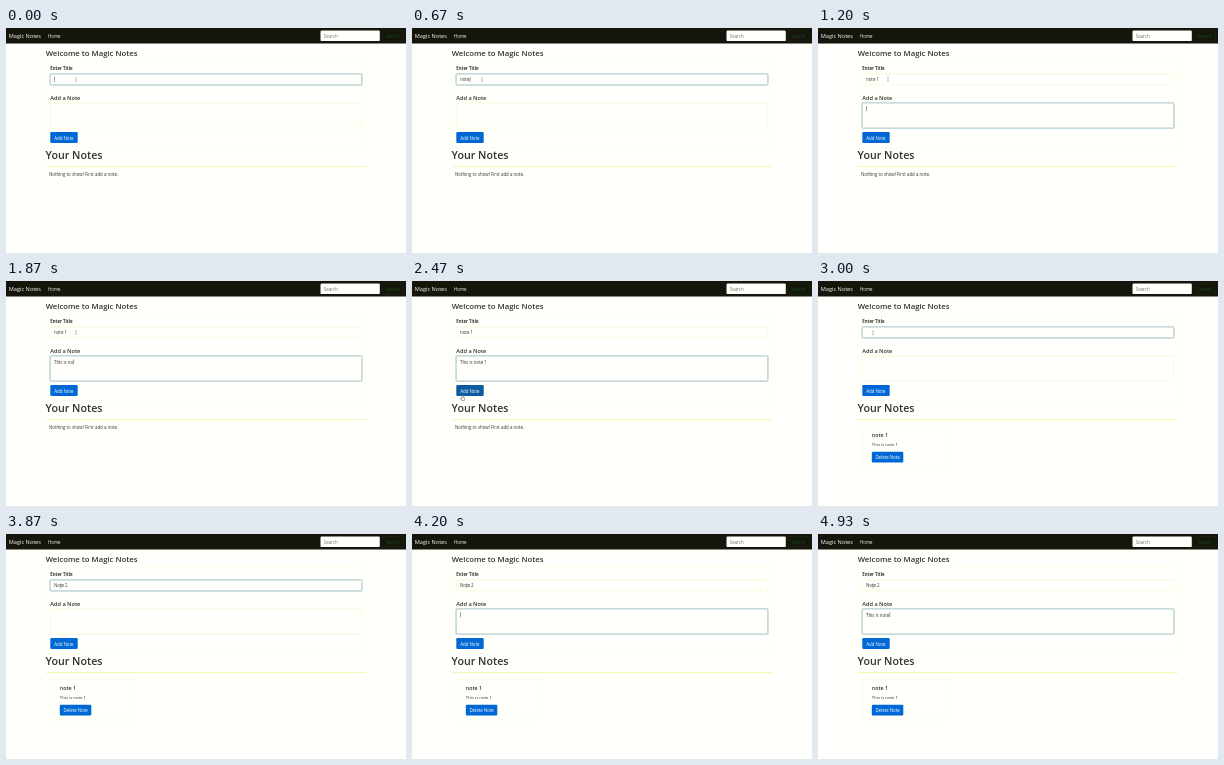
These frames come from a looping animation (400x225 px, 4.99 s). An HTML page:

```html
<!DOCTYPE html>
<html lang="en">
<head>
<meta charset="utf-8">
<title>Magic Notes</title>
<style>
  html, body { margin: 0; width: 100%; height: 100%; overflow: hidden; background: #fffffc; }
  svg { display: block; width: 100%; height: 100%; }
  text { font: 4.4px "Open Sans", "Noto Sans", sans-serif; fill: #34342a; white-space: pre; }
  .brand { font-size: 5.6px; fill: #fff; }
  .light { fill: #fff; }
  .muted { fill: #74746a; }
  .success { fill: #174d14; }
  .h1 { font-size: 10.7px; font-weight: 600; }
  .h3 { font-size: 7.73px; font-weight: 600; }
  .h5 { font-size: 5.6px; font-weight: 600; }
  .label { font-size: 4.3px; font-weight: 700; }
  .card { fill: none; stroke: #f9f9d6; stroke-width: .5; }
  .field { fill: #fffffc; stroke: #f3f3bc; stroke-width: .5; }
  .ring { fill: none; stroke: #d8e9ee; stroke-width: 1.2; }
  .edge { fill: none; stroke: #94b8c0; stroke-width: .6; }
  .btn { fill: #0068d4; }
  .caret { fill: #44443a; }
</style>
</head>
<body>
<svg viewBox="0 0 400 225" preserveAspectRatio="none">
  <rect width="400" height="225" fill="#fffffc"/>
  <rect width="400" height="15.5" fill="#15150c"/>
  <text class="brand" x="2.8" y="10.1">Magic Notes</text>
  <text class="light" x="42" y="9.8">Home</text>
  <rect x="314.5" y="2.5" width="59.3" height="10.6" rx="1.2" fill="#fffffc"/>
  <text class="muted" x="317.8" y="9.8">Search</text>
  <rect x="376" y="2.6" width="21.2" height="10.4" rx="1.2" fill="none" stroke="#1c3610" stroke-width=".4"/>
  <text class="success" x="379.5" y="9.8">Search</text>

  <text class="h3" x="39.7" y="28.2">Welcome to Magic Notes</text>
  <rect class="card" x="40" y="33" width="320" height="86.5" rx="1"/>
  <text class="label" x="44.3" y="42.2">Enter Title</text>
  <rect class="field" x="44.2" y="46" width="311.6" height="10.8" rx="1.2"/>
  <g id="titleFocus">
    <rect class="ring" x="43.7" y="45.5" width="312.6" height="11.8" rx="1.6"/>
    <rect class="edge" x="44.2" y="46" width="311.6" height="10.8" rx="1.2"/>
  </g>
  <text id="title" x="48" y="53.4"></text>

  <text class="h5" x="44.3" y="71.8">Add a Note</text>
  <rect class="field" x="44.2" y="75" width="311.6" height="25" rx="1.2"/>
  <g id="noteFocus">
    <rect class="ring" x="43.7" y="74.5" width="312.6" height="26" rx="1.6"/>
    <rect class="edge" x="44.2" y="75" width="311.6" height="25" rx="1.2"/>
  </g>
  <text id="note" x="48" y="82.5"></text>
  <rect id="caret" class="caret" width=".5" height="5"/>

  <rect id="add" class="btn" x="44.3" y="104.1" width="27.4" height="10.9" rx="1.2"/>
  <text class="light" x="48.2" y="111.5">Add Note</text>

  <text class="h1" x="39.6" y="131">Your Notes</text>
  <rect x="40" y="138" width="320" height=".8" fill="#f4f4a2"/>
  <text id="empty" x="43" y="148.2">Nothing to show! First add a note.</text>
  <g id="saved">
    <rect class="card" x="44.2" y="145.4" width="84.8" height="40.4" rx="1.2"/>
    <text class="h5" x="53.8" y="156" style="font-size:5.3px">note 1</text>
    <text x="53.8" y="164.5" style="font-size:4.3px">This is note 1</text>
    <rect class="btn" x="53.8" y="170.8" width="31.5" height="10.7" rx="1.2"/>
    <text class="light" x="57.4" y="178.1">Delete Note</text>
  </g>

  <g id="pointer">
    <path id="beam" d="M-.6-1.8H.6M0-1.8V1.8M-.6 1.8H.6" fill="none" stroke="#66665a" stroke-width=".4"/>
    <path id="hand" d="M-.5 0Q0-.7.5 0V1.8L2 2.2Q2.5 2.4 2.3 3.2L1.8 5.2H-.7L-2 3.2Q-1.8 2.4-.5 3.2Z" fill="#fff" stroke="#22220f" stroke-width=".4"/>
    <path id="arrow" d="M0 0V4.4L1 3.5 1.7 5 2.3 4.7 1.7 3.3H3Z" fill="#fff" stroke="#22220f" stroke-width=".4"/>
  </g>
</svg>
<script>
  const LOOP = 4990, SAVE = 2540;
  const $ = id => document.getElementById(id);
  const show = (id, on) => { $(id).style.display = on ? "" : "none"; };
  const clamp = v => Math.max(0, Math.min(1, v));
  const ramp = (t, from, to) => clamp((t - from) / (to - from));
  const ease = p => p * p * (3 - 2 * p);

  // Text typed so far, one character per step
  const typed = (text, t, start, step) =>
    text.slice(0, t < start ? 0 : Math.floor((t - start) / step) + 1);

  const titleAt = t => {
    if (t >= SAVE) return typed("Note 2", t, 3270, 100);
    return t < 720 ? typed("note", t, 470, 65) : typed("note 1", t, 340, 110);
  };
  const noteAt = t => t < SAVE
    ? typed("This is note 1", t, 1340, 56)
    : typed("This is note", t, 4210, 60);

  const path = [
    [0, 70, 51.5], [2140, 70, 51.5], [2430, 50.5, 114.3],
    [2620, 50.5, 114.3], [2890, 55, 52], [LOOP, 55, 52]
  ];
  function pointerAt(t) {
    const i = path.findIndex(p => p[0] > t);
    const [t0, x0, y0] = path[i - 1], [t1, x1, y1] = path[i];
    const k = ease(ramp(t, t0, t1));
    return [x0 + (x1 - x0) * k, y0 + (y1 - y0) * k];
  }

  const within = (x, y, l, t, r, b) => x >= l && x <= r && y >= t && y <= b;
  const focusAt = (t, spans) =>
    Math.max(...spans.map(([a, b]) => Math.min(ramp(t, a, a + 120), 1 - ramp(t, b, b + 120))));

  function drawCaret(t) {
    const onNote = (t >= 1070 && t < SAVE) || t >= 4070;
    const box = $(onNote ? "note" : "title");
    const lit = t < 330 || (t >= 470 && t < 2200) || (t >= 3270 && t < 3830) || t >= 4070;
    show("caret", lit);
    $("caret").setAttribute("x", 48 + (box.textContent ? box.getComputedTextLength() + .4 : 0));
    $("caret").setAttribute("y", onNote ? 78.2 : 49.1);
  }

  function draw(t) {
    $("title").textContent = titleAt(t);
    $("note").textContent = noteAt(t);
    $("titleFocus").style.opacity = focusAt(t, [[-200, 1070], [2850, 4070]]);
    $("noteFocus").style.opacity = focusAt(t, [[1070, SAVE], [4070, LOOP + 200]]);
    drawCaret(t);

    show("empty", t < SAVE);
    show("saved", t >= SAVE);

    const [x, y] = pointerAt(t);
    const onButton = within(x, y, 44, 104, 72, 115);
    const onField = within(x, y, 44, 46, 356, 57) || within(x, y, 44, 75, 356, 100);
    $("pointer").setAttribute("transform", `translate(${x} ${y})`);
    show("hand", onButton);
    show("beam", onField);
    show("arrow", !onButton && !onField);
    $("add").style.fill = onButton ? "#0b5aa2" : "";
  }

  function tick() {
    draw(performance.now() % LOOP);
    requestAnimationFrame(tick);
  }
  tick();
</script>
</body>
</html>
```
